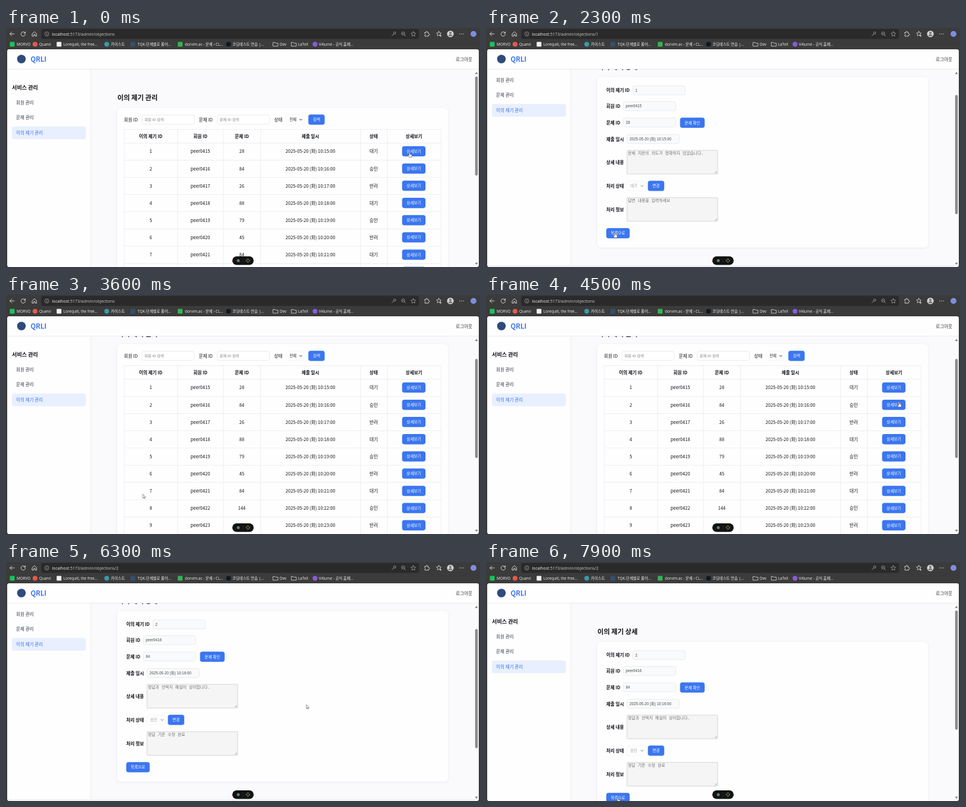
Recreate the animation shown at these times as an HTML page with a canvas. Size 800 px wide and 404 px high, loop 8 s.

```html
<!DOCTYPE html>
<html>
<head>
<meta charset="utf-8">
<title>이의 제기 관리</title>
<style>
html, body { margin: 0; width: 100%; height: 100%; overflow: hidden; background: #3b3b3b; }
canvas { display: block; width: 800px; height: 404px; }
</style>
</head>
<body>
<canvas id="stage"></canvas>
<script>
const W = 800, H = 404, LOOP = 8000;
const cv = document.getElementById('stage');
const dpr = window.devicePixelRatio || 1;
cv.width = W * dpr;
cv.height = H * dpr;
const c = cv.getContext('2d');

const KR = '"Noto Sans CJK KR", "Noto Sans KR", "Noto Sans", sans-serif';
const UI = '"Open Sans", "Noto Sans CJK KR", sans-serif';
const FORM = '"Liberation Sans", "Noto Sans CJK KR", sans-serif';
const MONO = '"Liberation Mono", "Noto Sans CJK KR", monospace';
const BLUE = '#3b76ef', INK = '#111318', LINE = '#e6e8ec';

// ---- timeline ----
const NAV = [[0, 'list'], [600, 'detail', 0], [2700, 'list'], [5000, 'detail', 1]];
const SCROLL = [[0, 0], [1400, 0], [1800, 52], [6500, 52], [6900, 0]];
const MOUSE = [
  [0, 681, 210], [700, 681, 210], [1200, 501.5, 205.5], [1700, 501.5, 205.5],
  [2200, 217.5, 346], [2800, 217.5, 346], [3200, 231, 337], [3700, 231, 337],
  [4400, 697, 181], [5200, 697, 181], [5900, 507, 241.5], [6900, 507, 241.5],
  [7700, 222.5, 398.5]
];

function sample(track, t) {
  let i = track.length - 1;
  while (i > 0 && track[i][0] > t) i--;
  const a = track[i], b = track[i + 1] || a;
  const p = b === a ? 0 : (t - a[0]) / (b[0] - a[0]);
  const e = p * p * (3 - 2 * p);
  return a.slice(1).map((v, k) => v + (b[k + 1] - v) * e);
}

// ---- drawing helpers ----
function rect(x, y, w, h, fill, r = 0, stroke) {
  c.beginPath();
  c.roundRect(x, y, w, h, r);
  if (fill) { c.fillStyle = fill; c.fill(); }
  if (stroke) { c.strokeStyle = stroke; c.lineWidth = 0.7; c.stroke(); }
}

function text(s, x, y, size, color = INK, font = KR, weight = 400, align = 'left') {
  c.font = `${weight} ${size}px ${font}`;
  c.fillStyle = color;
  c.textAlign = align;
  c.fillText(s, x, y + size * 0.37);
}

function dot(x, y, r, fill, stroke, width = 0.9) {
  c.beginPath();
  c.arc(x, y, r, 0, Math.PI * 2);
  if (fill) { c.fillStyle = fill; c.fill(); }
  if (stroke) { c.strokeStyle = stroke; c.lineWidth = width; c.stroke(); }
}

function path(x, y, d, stroke, fill, width = 0.9) {
  c.save();
  c.translate(x, y);
  const p = new Path2D(d);
  if (fill) { c.fillStyle = fill; c.fill(p); }
  if (stroke) {
    c.strokeStyle = stroke;
    c.lineWidth = width;
    c.lineJoin = c.lineCap = 'round';
    c.stroke(p);
  }
  c.restore();
}

let hits = [];
function button(label, x, y, w, scroll) {
  rect(x, y, w, 17.3, BLUE, 3.8);
  text(label, x + w / 2, y + 8.7, 6.65, '#fff', KR, 500, 'center');
  hits.push([x, y - scroll, w, 17.3]);
}

function field(s, x, y, color = '#4b4b4b', fill = '#f9fafb', size = 6.33) {
  rect(x, y, 88.3, 15.3, fill, 3.5, '#e1e3e7');
  text(s, x + 4.3, y + 7.4, size, color, FORM);
}

function select(s, x, y, w, color, ink) {
  rect(x, y, w, 16, '#fefefe', 3.5, '#f0f1f4');
  text(s, x + 5.5, y + 8, 6.33, color, FORM);
  path(x + w - 7.5, y + 7, 'M0 0L2 2L4 0', ink, null, 1);
}

function area(s, y) {
  rect(238, y, 153, 40, '#f5f5f5', 0.5, '#c6c7c9');
  text(s, 239.5, y + 4.8, 6.87, '#707070', MONO);
  path(386.5, y + 35.5, 'M0 3L3 0M2 3L3 2', '#777', null, 0.6);
}

function star(x, y, r, stroke, fill) {
  let d = '';
  for (let i = 0; i < 10; i++) {
    const a = -Math.PI / 2 + i * Math.PI / 5, q = i % 2 ? r * 0.48 : r;
    d += (i ? 'L' : 'M') + q * Math.cos(a) + ' ' + q * Math.sin(a);
  }
  path(x, y, d + 'Z', stroke, fill, 0.8);
}

// ---- browser frame ----
const MARKS = [
  ['MORVO', 18, 10.5, '#19c45c', 'box'],
  ['Quarvi', 56, 49, '#e9584a', 'dot'],
  ['Lorequill, the free...', 97, 89.5, '#f2f2f2', 'box'],
  ['카이스트', 177, 170, '#3a9aa8', 'dot'],
  ['TQK-단계별로 풀어...', 222, 214, '#35506b', 'box'],
  ['dorvim.ac - 문제 › CL...', 302, 294, '#35b454', 'box'],
  ['코딩테스트 연습 |...', 382, 375.5, '#101820', 'dot'],
  ['Dev', 462, 455, '', 'folder'],
  ['LaTeX', 493, 486, '', 'folder'],
  ['V4lume - 공식 홈페...', 528, 521.5, '#8a5be0', 'dot']
];

function chrome(tail) {
  const ink = '#e0e0e0', dim = '#a6a6a6';
  rect(0, 0, W, H, '#3b3b3b');
  rect(59.5, 1.5, 637.5, 17, '#2a2a2a', 4);
  path(6.5, 10, 'M7.5 0H0M3.3 -3.3L0 0L3.3 3.3', ink);
  path(29, 10, 'M3.4 -1.4A3.7 3.7 0 1 0 3.7 .6M3.7 -3.8V-1.2H1.1', ink);
  path(48, 10, 'M-3.6 -.4L0 -3.8L3.6 -.4V3.8H1.2V1H-1.2V3.8H-3.6Z', ink);
  dot(69, 10, 3.5, null, dim, 0.8);
  path(69, 10, 'M0 -.2V1.8M0 -1.7V-1.6', dim);
  const host = 'localhost';
  text(host, 77.5, 10, 6.95, '#f4f4f4', UI);
  const x = 77.5 + c.measureText(host).width;
  text(':5173/admin/objections' + tail, x, 10, 6.95, '#cccccc', UI);

  dot(656, 8.5, 1.9, null, dim, 0.8);
  path(654.5, 10, 'M0 0L-3 3', dim);
  dot(670.3, 9.3, 2.7, null, dim, 0.8);
  path(672.3, 11.3, 'M0 0L2.2 2.2M-3.3 -2H-.8', dim, null, 0.8);
  star(687.5, 10.3, 4.3, dim);
  path(710, 10, 'M-3 -2.3H-1A1.3 1.3 0 1 1 1.4 -2.3H3V-.3A1.3 1.3 0 1 1 3 2V3.8H-3V1.8A1.3 1.3 0 0 0 -3 -.5Z', ink);
  star(730.5, 9.8, 4.3, ink);
  path(732, 13, 'M0 0H3M1.5 -1.5V1.5', ink, null, 0.7);
  dot(750, 10, 5.6, '#d5d5d5');
  dot(750, 8.3, 2, '#777');
  path(750, 13.7, 'M-3.3 0A3.3 3.3 0 0 1 3.3 0Z', null, '#777');
  [-3, 0, 3].forEach(d => dot(769 + d, 10, 0.7, ink));
  dot(789, 10, 5, '#7c8fe0');

  for (const [label, tx, ix, color, kind] of MARKS) {
    if (kind === 'box') rect(ix - 4, 23.5, 8, 8, color, 1);
    else if (kind === 'dot') dot(ix, 27.5, 4, color);
    else path(ix, 27.5, 'M-4 -3H-1L0 -1.8H4V3.2H-4Z', ink, null, 0.8);
    text(label, tx, 27.5, 6.4, '#f2f2f2', UI);
  }
}

// ---- pages ----
const NUMS = ['28', '84', '26', '88', '79', '45', '84', '144', ''];
const STATES = ['대기', '승인', '반려'];
const COLS = [199, 289.5, 366.5, 429.5, 598, 643, 734];
const HEADS = ['이의 제기 ID', '회원 ID', '문제 ID', '제출 일시', '상태', '상세보기'];
const member = i => 'peer04' + (15 + i);
const stamp = i => `2025-05-20 (화) 10:${15 + i}:00`;

function card(h) {
  c.save();
  c.shadowColor = 'rgba(30,40,70,.07)';
  c.shadowBlur = 5 * dpr;
  c.shadowOffsetY = dpr;
  rect(188, 135, 558, h, '#fefefe', 6);
  c.restore();
}

function list(scroll) {
  text('이의 제기 관리', 188, 117.5, 11.4, INK, KR, 700);
  card(500);
  text('회원 ID', 199, 155, 7.6);
  field('회원 ID 검색', 229.5, 147.2, '#7c7c7c', '#fff', 6.2);
  text('문제 ID', 325.5, 155, 7.6);
  field('문제 ID 검색', 356.5, 147.2, '#7c7c7c', '#fff', 6.2);
  text('상태', 452.5, 155, 7.6);
  select('전체', 473, 147, 30, '#222', '#222');
  button('검색', 510.3, 146.3, 27.5, scroll);

  const top = 171, body = 194, row = 29.1;
  const mid = k => (COLS[k] + COLS[k + 1]) / 2;
  c.fillStyle = LINE;
  COLS.forEach(x => c.fillRect(x, top, 0.7, body - top + row * 9));
  c.fillRect(199, top, 535.7, 0.7);
  HEADS.forEach((s, k) => text(s, mid(k), 183, 7.6, INK, KR, 700, 'center'));
  for (let i = 0; i < 9; i++) {
    const y = body + row * i, cy = y + 14.6;
    rect(199, y, 535.7, 0.7, LINE);
    [i + 1, member(i), NUMS[i], stamp(i), STATES[i % 3]].forEach((s, k) =>
      text(String(s), mid(k), cy, 7.6, INK, KR, 400, 'center'));
    button('상세보기', 668.5, cy - 8.8, 39.5, scroll);
  }
}

const NOTES = [
  ['문제 지문의 의도가 명확하지 않았습니다.', '답변 내용을 입력하세요'],
  ['정답과 선택지 해설이 상이합니다.', '정답 기준 수정 완료']
];
const LABELS = [['이의 제기 ID', 157.5], ['회원 ID', 184.3], ['문제 ID', 212], ['제출 일시', 240],
  ['상세 내용', 279], ['처리 상태', 319], ['처리 정보', 359]];

function detail(i, scroll) {
  text('이의 제기 상세', 188, 117.5, 11.4, INK, KR, 700);
  card(288);
  LABELS.forEach(([s, y]) => text(s, 203, y, 7.6, INK, KR, 700));
  field(String(i + 1), 247.8, 149.8);
  field(member(i), 231.8, 176.5);
  field(NUMS[i], 231.8, 204);
  button('문제 확인', 327.5, 203.4, 41.5, scroll);
  field(stamp(i), 238, 232);
  area(NOTES[i][0], 258.8);
  select(STATES[i], 238, 311, 31, '#9a9a9a', '#777');
  button('변경', 273.2, 310.2, 27.6, scroll);
  area(NOTES[i][1], 338.8);
  button('목록으로', 203, 390.3, 39.5, scroll);
}

function sidebar(shift, bottom) {
  rect(2, 69, 141, bottom - 69, '#fefefe');
  rect(142.5, 69, 0.8, bottom - 69, LINE);
  c.save();
  c.translate(0, -shift);
  text('서비스 관리', 10, 100.5, 9.12, INK, KR, 700);
  rect(10, 166.5, 125, 21.5, '#e8effe', 4);
  text('회원 관리', 17, 125.7, 7.6, '#343944');
  text('문제 관리', 17, 151.5, 7.6, '#343944');
  text('이의 제기 관리', 17, 177.3, 7.6, BLUE, KR, 500);
  c.restore();
}

function topbar() {
  rect(2, 36, 796, 33.5, '#fefefe');
  rect(2, 69.3, 796, 0.8, '#e3e5e9');
  dot(26, 52.5, 7.3, '#2f4b7c');
  text('QRLI', 41.5, 52.5, 11.4, BLUE, KR, 700);
  text('로그아웃', 759, 52.8, 7.6, '#30343c');
}

function scrollbar(y, len) {
  rect(790, 70, 8, 334, '#fbfbfb');
  rect(791.7, y, 4.6, len, '#8b8b8b', 2.3);
  path(794, 76, 'M-2.5 1.8L0 -1.8L2.5 1.8Z', null, '#7d7d7d');
  path(794, 398.5, 'M-2.5 -1.8L0 1.8L2.5 -1.8Z', null, '#7d7d7d');
}

function devPill() {
  rect(382, 386, 36, 14.5, '#121313', 7.25);
  dot(392, 393.2, 2.5, '#64806f');
  rect(399.8, 390, 0.5, 6.5, '#333');
  dot(408.3, 393.2, 2.4, null, '#7f8f58', 0.8);
  path(408.3, 393.2, 'M0 -3.6V-2M0 2V3.6M-3.6 0H-2M2 0H3.6', '#7f8f58', null, 0.8);
}

function cursor(x, y) {
  const over = hits.some(([bx, by, w, h]) => x >= bx && x <= bx + w && y >= by && y <= by + h);
  if (over) {
    path(x, y, 'M-.9 .3Q0 -.8 .9 .3V3.2L3.6 3.9Q4.3 4.2 4.2 5L3.6 8.4H-.8L-3 5.4Q-2.9 4.3 -.9 5.4Z', '#333', '#fff', 0.6);
  } else {
    path(x, y, 'M0 0V6.4L1.4 5L2.4 7.3L3.4 6.8L2.4 4.6H4.4Z', '#444', '#fff', 0.6);
  }
}

function draw(t) {
  const nav = NAV.filter(n => n[0] <= t).pop();
  const isList = nav[1] === 'list';
  const [scroll] = sample(SCROLL, t);
  hits = [];
  c.setTransform(dpr, 0, 0, dpr, 0, 0);
  chrome(isList ? '' : '/' + (nav[2] + 1));

  c.save();
  c.beginPath();
  c.roundRect(2, 36, 796, 368, 4);
  c.clip();
  rect(2, 36, 796, 368, '#fafafc');
  c.save();
  c.translate(0, -scroll);
  if (isList) list(scroll);
  else detail(nav[2], scroll);
  c.restore();
  if (!isList) rect(2, 453 - scroll, 788, 30, '#f0f1f6');
  sidebar(isList ? 0 : Math.max(0, scroll - 14), isList ? H : Math.min(H, 453 - scroll));
  topbar();
  scrollbar(82 + scroll * (isList ? 0.5 : 0.6), isList ? 167.5 : 201.5);
  devPill();
  const [mx, my] = sample(MOUSE, t);
  cursor(mx, my);
  c.restore();
}

const start = performance.now();
function tick() {
  const t = (performance.now() - start) % LOOP;
  draw(Math.floor(t / 100) * 100);
  requestAnimationFrame(tick);
}
tick();
</script>
</body>
</html>
```
